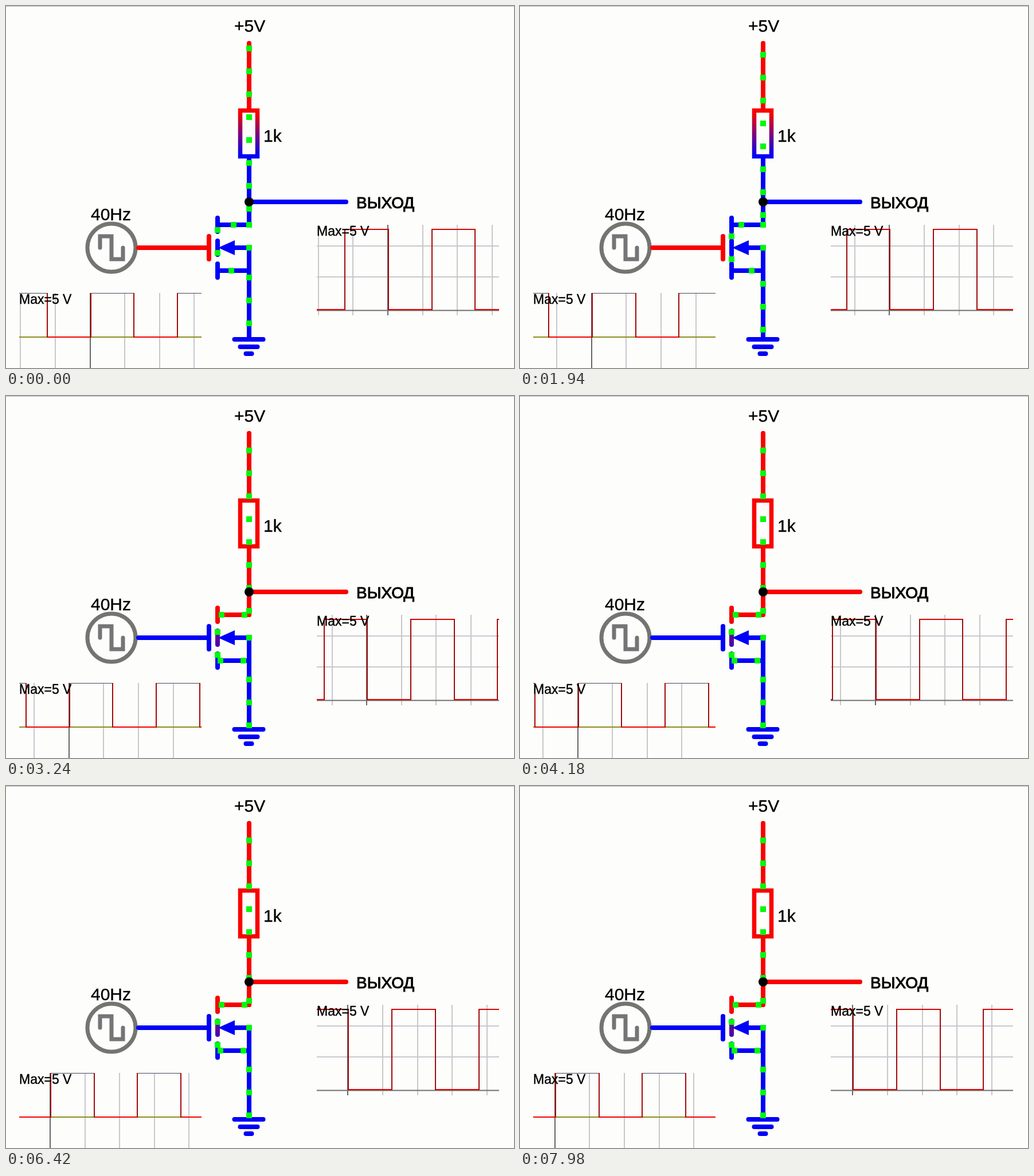
These frames come from a looping animation (886x632 px, 8 s). An HTML page with a canvas:

```html
<!DOCTYPE html>
<html lang="ru">
<head>
<meta charset="utf-8">
<style>
  html, body { margin: 0; width: 100%; height: 100%; overflow: hidden; background: #fdfdfb; }
  canvas { display: block; }
</style>
</head>
<body>
<canvas width="886" height="632"></canvas>
<script>
const ctx = document.querySelector('canvas').getContext('2d');
const LOOP = 8000;
const RED = '#f80000', BLUE = '#0000f8', GREEN = '#00f80c', GRAY = '#747470';
const HALF = 75.7, GRID = 60.6, SCOPE_WIDTH = 318, SCOPE_GAP = 519.5;

// [step, value] pairs
const scroll = [[0, 147.5], [14, 137.9], [41, 125.8], [70, 110.7], [109, 92], [137, 77.9], [171, 61.8]];
const flow = [[0, 34], [14, 70], [41, 125], [64, 175]];

// Steps last 20, 100 and 20 ms in turn.
function stepAt(t) {
  const r = t % 140;
  return Math.floor(t / 140) * 3 + (r < 20 ? 0 : r < 120 ? 1 : 2);
}

function sample(table, n) {
  const last = table[table.length - 1];
  if (n >= last[0]) return last[1];
  const i = table.findIndex(k => k[0] > n);
  const [a, from] = table[i - 1], [b, to] = table[i];
  return from + (to - from) * (n - a) / (b - a);
}

function line(color, width, points, cap = 'round') {
  ctx.strokeStyle = color;
  ctx.lineWidth = width;
  ctx.lineCap = cap;
  ctx.lineJoin = 'miter';
  ctx.beginPath();
  points.forEach(([x, y]) => ctx.lineTo(x, y));
  ctx.stroke();
}

const wire = (color, ...points) => line(color, 8, points);

function fade(y1, y2, from, to) {
  const g = ctx.createLinearGradient(0, y1, 0, y2);
  g.addColorStop(0, from);
  g.addColorStop(1, to);
  return g;
}

function text(str, x, y, size, weight = 0.4) {
  ctx.fillStyle = ctx.strokeStyle = '#000';
  ctx.lineWidth = weight;
  ctx.font = `${size}px "Liberation Sans", Arial, sans-serif`;
  ctx.fillText(str, x, y);
  ctx.strokeText(str, x, y);
}

function dot(x, y) {
  ctx.fillStyle = GREEN;
  ctx.fillRect(x - 5, y - 5, 10, 10);
}

// Dots every 40 px along a straight path, starting at the given phase.
function dots(x1, y1, x2, y2, phase) {
  const len = Math.hypot(x2 - x1, y2 - y1);
  for (let d = ((phase % 40) + 40) % 40; d < len; d += 40) {
    dot(Math.round(x1 + (x2 - x1) * d / len), Math.round(y1 + (y2 - y1) * d / len));
  }
}

function disc(x, y, r) {
  ctx.beginPath();
  ctx.arc(x, y, r, 0, Math.PI * 2);
}

function scope(s, edge) {
  const right = s.x + SCOPE_WIDTH;
  ctx.save();
  ctx.beginPath();
  ctx.rect(s.x, s.top, SCOPE_WIDTH, s.bottom - s.top);
  ctx.clip();
  s.rows.forEach(y => line('#c8c8d0', 2, [[s.x, y], [right, y]], 'butt'));
  for (let k = -3; k < 6; k++) {
    const x = Math.round(edge - 1 + k * GRID);
    line(k ? '#c8c8cc' : '#66666a', 2, [[x, s.top], [x, s.bottom]], 'butt');
  }
  line(s.zeroColor, 2, [[s.x, s.zero], [right, s.zero]], 'butt');
  for (let k = -3; k < 5; k++) {
    const x = Math.round(edge + k * HALF), next = Math.round(edge + (k + 1) * HALF);
    const high = (k % 2 === 0) === s.risesFirst;
    const y = high ? s.high : s.low;
    line(high ? s.highColor : '#f00000', 2, [[x, y], [next, y]], 'butt');
    line('#a00c0c', 2, [[x, s.high - 1], [x, s.low + 1]], 'butt');
  }
  ctx.restore();
  text('Max=5 V', s.x, s.label, 23);
}

const inputScope = {
  x: 23, top: 501, bottom: 632, high: 501, low: 578, zero: 578, rows: [], label: 520,
  zeroColor: '#8c8c1c', highColor: '#48485c', risesFirst: true
};
const outputScope = {
  x: 542, top: 382, bottom: 540, high: 390, low: 530, zero: 531.5, rows: [419, 473], label: 401,
  zeroColor: '#707070', highColor: '#e00000', risesFirst: false
};

function generator() {
  disc(184, 422, 42);
  ctx.strokeStyle = GRAY;
  ctx.lineWidth = 7;
  ctx.stroke();
  line('#757578', 7, [[164, 422], [164, 402], [184, 402], [184, 442], [204, 442], [204, 422]]);
}

function circuit(on, phase) {
  const gate = on ? RED : BLUE, out = on ? BLUE : RED;

  wire(RED, [424, 65], [424, 182]);
  wire(out, [424, 263], [424, 382]);
  wire(out, [424, 342], [593, 342]);
  ctx.strokeStyle = fade(186, 262, RED, out);
  ctx.lineWidth = 7.5;
  ctx.strokeRect(408.5, 182.5, 30, 80);

  generator();
  wire(gate, [231, 422], [350, 422]);
  wire(gate, [354, 402], [354, 442]);

  wire(out, [424, 382], [369, 382]);
  wire(BLUE, [369, 462], [424, 462]);
  wire(BLUE, [395, 422], [424, 422], [424, 582]);
  wire(out, [369, 370], [369, 394]);
  wire(on ? BLUE : fade(408, 436, '#780088', '#4800b0'), [369, 410], [369, 434]);
  wire(BLUE, [369, 450], [369, 474]);
  ctx.fillStyle = BLUE;
  ctx.beginPath();
  ctx.moveTo(370, 422);
  ctx.lineTo(399, 409);
  ctx.lineTo(399, 435);
  ctx.fill();

  [[398, 449, 582], [408, 439, 595], [418, 429, 607]].forEach(([a, b, y]) =>
    wire(BLUE, [a + 0.5, y], [b - 0.5, y]));

  dots(424, 65, 424, 382, phase - 65);
  dots(424, 382, 369, 382, phase - 7);
  dots(369, 382, 369, 462, phase - 25);
  dots(369, 462, 424, 462, phase - 10);
  dots(424, 462, 424, 582, phase - 462);
  dot(424, 422);
  if (on) dot(424, 382);

  ctx.fillStyle = '#000';
  disc(424, 342, 8);
  ctx.fill();

  text('+5V', 398, 45, 30);
  text('1k', 449, 237, 30);
  text('40Hz', 148, 374, 30);
  text('ВЫХОД', 611, 353, 28, 1);
}

function draw(t) {
  const n = stepAt(t), edge = sample(scroll, n);
  ctx.fillStyle = '#fdfdfb';
  ctx.fillRect(0, 0, 886, 632);
  ctx.fillStyle = '#b4b4b8';
  ctx.fillRect(0, 0, 886, 1);
  scope(inputScope, edge);
  scope(outputScope, edge + SCOPE_GAP);
  circuit(edge + 3 * HALF > inputScope.x + SCOPE_WIDTH, sample(flow, n));
}

const start = performance.now();
function tick() {
  draw((performance.now() - start) % LOOP);
  requestAnimationFrame(tick);
}
tick();
</script>
</body>
</html>
```
